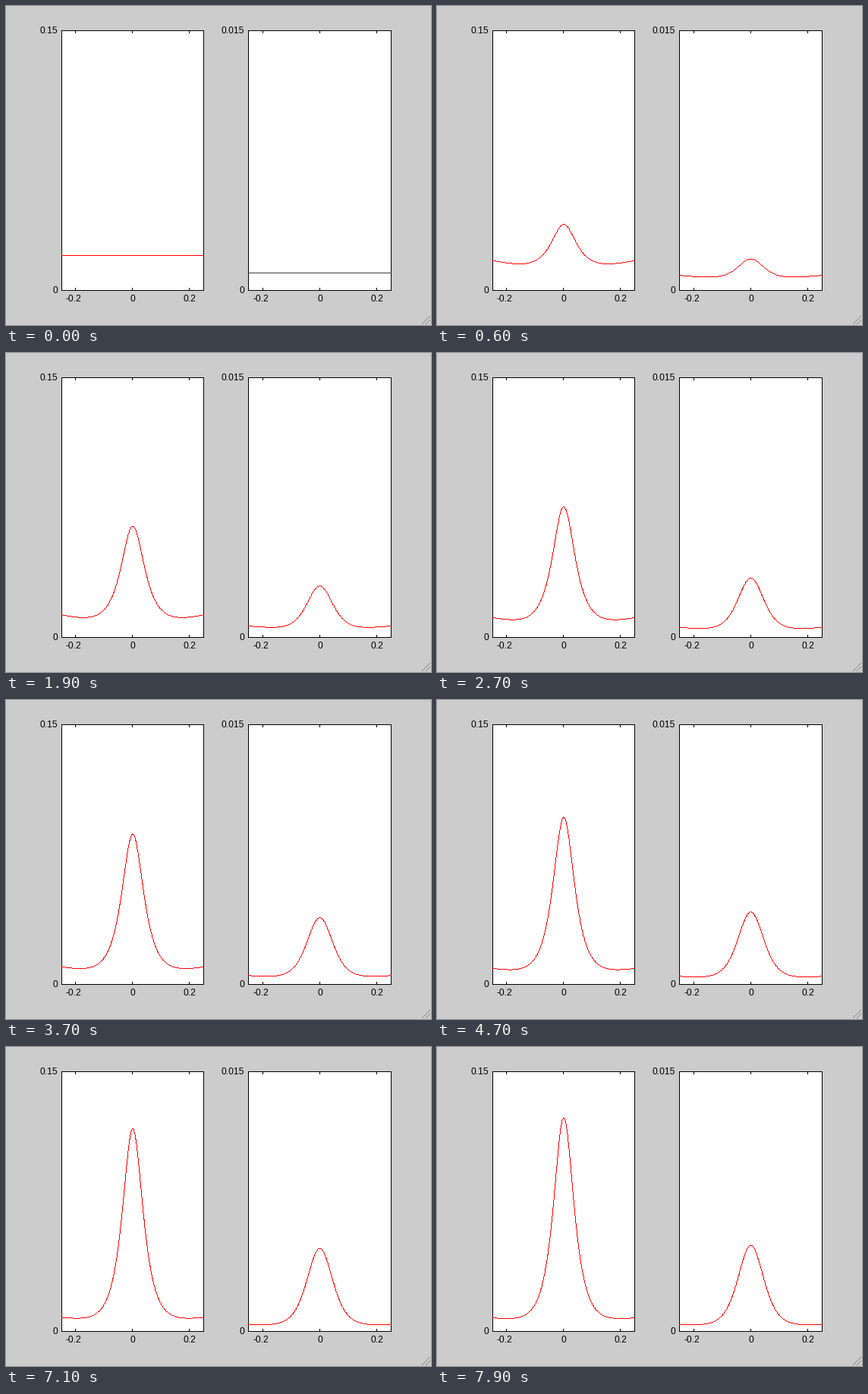
A matplotlib script for the animation above (8 s loop, 560 by 420 pixels).

```python
import numpy as np
import matplotlib.pyplot as plt
from matplotlib.animation import FuncAnimation
from matplotlib.patches import Rectangle

plt.rcParams["font.family"] = "Liberation Sans"

W, H, DPI = 560, 420, 100
TOP, BASE = 32, 374        # pixel rows of the plot frames
HALF = 93.5                # half a plot's width
FRAMES, STEP = 80, 100
RED, DARK, GRAY = (255, 0, 0, 255), (64, 64, 64, 255), (128, 128, 128, 255)

fig = plt.figure(figsize=(W / DPI, H / DPI), dpi=DPI, facecolor="#cccccc")
ax = fig.add_axes([0, 0, 1, 1])
ax.axis("off")


def box(x0, y0, x1, y1, color="black"):
    """Fill a block of whole pixels, both corners included."""
    ax.add_patch(Rectangle((x0, y0), x1 - x0 + 1, y1 - y0 + 1, fc=color,
                           lw=0, antialiased=False, snap=False))


def label(x, y, s, ha="center"):
    ax.text(x, y, s, ha=ha, va="baseline", fontsize=12 * 72 / DPI)


def panel(left, right, ymax):
    """White plot box with ticks and labels; returns its pixel columns."""
    box(left, TOP, right, BASE)
    box(left + 1, TOP + 1, right - 1, BASE - 1, "white")
    mid = (left + right) // 2
    for off, name, shift in ((-75, "-0.2", -3), (0, "0", 0), (75, "0.2", 0)):
        x = mid + off
        box(x, TOP, x, TOP + 3)
        box(x, BASE - 3, x, BASE)
        label(x + .5 + shift, 389, name)
    label(left - 5, TOP + 4, ymax, "right")
    label(left - 5, BASE + 4, "0", "right")
    cols = np.arange(left, right + 1)
    return cols, cols - (left + right) / 2


def trace(img, xs, ys, color):
    """Draw a one-pixel polyline without antialiasing."""
    for x0, x1, y0, y1 in zip(xs[:-1], xs[1:], ys[:-1], ys[1:]):
        n = int(max(abs(x1 - x0), np.ceil(abs(y1 - y0)))) + 1
        cols = np.rint(np.linspace(x0, x1, n)).astype(int)
        rows = np.rint(np.linspace(y0, y1, n)).astype(int)
        img[rows, cols] = color


def profile(u, bump, peak, low, rise):
    """Bump plus shallow parabola, scaled to the given peak and minimum."""
    edge = rise * (u / HALF) ** 2
    floor = low
    for _ in range(4):
        floor = low - np.min((peak - floor) * bump + edge)
    return floor + (peak - floor) * bump + edge


def growth(t, start, gain, tau, slope):
    return start + gain * (1 - np.exp(-t / tau)) + slope * t


x1, u1 = panel(73, 260, "0.15")
x2, u2 = panel(319, 507, "0.015")

# transparent pixel layer: window resize grip below, curves on top
base = np.zeros((H, W, 4), np.uint8)
trace(base, [548, 558], [418, 408], GRAY)
trace(base, [553, 558], [418, 413], GRAY)
layer = ax.imshow(base, extent=(0, W, H, 0), interpolation="nearest",
                  aspect="auto", zorder=5)
ax.set_xlim(0, W)
ax.set_ylim(H, 0)


def update(i):
    t = i * STEP / 1000
    decay = np.exp(-.65 * t ** .74)
    rise = (1 - np.exp(-t / .4)) * (3 + 12 * np.exp(-t / 4))
    width = 11.4 + 3.6 * np.exp(-t / 3.6)

    h1 = profile(u1, 1 / np.cosh(u1 / width),
                 growth(t, 46, 94, 1.555, 18), 15.5 + 30.5 * decay, rise)
    h2 = profile(u2, 1 / np.cosh(u2 / 22.5) ** 2,
                 growth(t, 23, 55.5, 1.81, 4.5), 8 + 15 * decay, .45 * rise)
    img = base.copy()
    trace(img, x1, BASE - h1, RED)
    trace(img, x2, BASE - h2, RED if i else DARK)
    layer.set_data(img)
    return layer,


anim = FuncAnimation(fig, update, frames=FRAMES, interval=STEP,
                     repeat=True, repeat_delay=0, blit=False)
plt.show()
```
